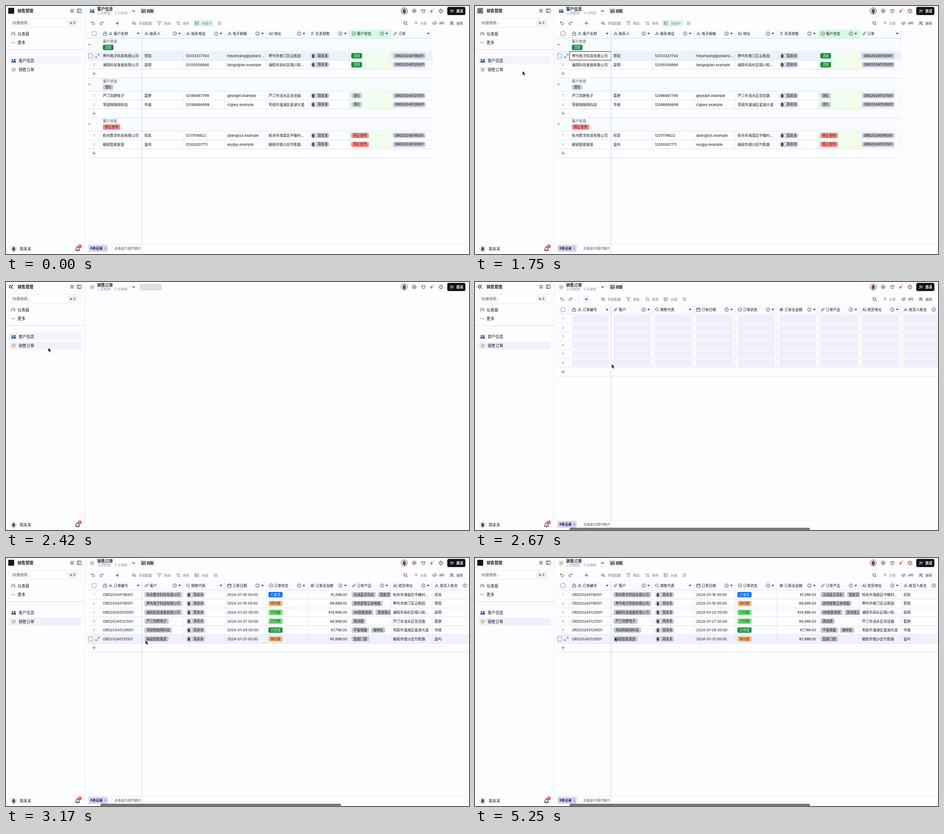
An HTML page that plays this animation: 1023x548 px, repeating every 5.33 s.

```html
<!DOCTYPE html>
<html lang="zh">
<head>
<meta charset="utf-8">
<title>销售管理</title>
<style>
html,body{margin:0;width:100%;height:100%;overflow:hidden;background:#fdfdff}
svg{display:block;width:100%;height:100%;font-family:Inter,"Noto Sans CJK SC","Noto Sans CJK",sans-serif}
</style>
</head>
<body>
<svg id="stage" viewBox="0 0 1023 548"></svg>
<script>
(() => {
const LOOP = 5330, PITCH = 19.55, INK = '#15171c', DIM = '#6f727b', LINE = '#d3ddec';
const col = i => i < 0 ? 209 : 300.6 + i * 91.56;

// drawing helpers
const txt = (x, y, s, o = {}) => {
  const {size = 7.92, fill = INK, w = 400, a = 'start'} = o;
  return `<text x="${x}" y="${y + size * .37}" font-size="${size}" fill="${fill}" font-weight="${w}" text-anchor="${a}" xml:space="preserve">${s}</text>`;
};
const box = (x, y, w, h, fill, r = 0, more = '') =>
  `<rect x="${x}" y="${y}" width="${w}" height="${h}" rx="${r}" fill="${fill}" ${more}/>`;
const hline = (x1, x2, y, c = LINE) => box(x1, y - .4, x2 - x1, .8, c);
const vline = (x, y1, y2, c = '#dbe5f3') => box(x - .4, y1, .8, y2 - y1, c);
const dot = (x, y, r, fill, more = '') => `<circle cx="${x}" cy="${y}" r="${r}" fill="${fill}" ${more}/>`;
const group = (id, s) => `<g id="${id}">${s}</g>`;

const circ = r => `M${-r} 0a${r} ${r} 0 1 0 ${2 * r} 0a${r} ${r} 0 1 0 ${-2 * r} 0`;
const ICONS = {
  menu: 'M-3.6-2.8H3.6M-3.6 0H3.6M-3.6 2.8H3.6',
  panel: 'M-4-3.8H4V3.8H-4ZM-1.2-3.8V3.8',
  fold: 'M-.4-3.8L-4.2 0L-.4 3.8M4-3.8L.2 0L4 3.8',
  gauge: 'M-2.8 2.8A4 4 0 1 1 2.8 2.8M0 .6L2-1.6',
  bell: 'M-4.6 2.6C-2.8 1-3.6-4.6 0-4.6S2.8 1 4.6 2.6ZM-1.2 4.8H1.2',
  down: 'M-2.6-1.2L0 1.4L2.6-1.2',
  grid: 'M-4-3.6H4V3.6H-4ZM-4-1H4M-1.2-1V3.6M-4 1.3H4',
  gear: 'M0-4.3L3.6-2.1V2.1L0 4.3L-3.6 2.1V-2.1Z' + circ(1.3),
  puzzle: 'M-4-1.6H-1.6C-2.4-4 .8-4.6 .8-1.8L3-3.6L4-1.4L2.4 .4C4.6 1.4 3 4 1.4 2.4L0 4L-2 2.6C-.8 .8-3.2 0-4-1.6Z',
  help: circ(4.2) + 'M-1.3-1C-1.2-2.8 1.5-2.6 1.3-.8C1.2 0 0 0 0 1M0 2.2V2.5',
  invite: 'M-3.6 3.6C-3.6 .2 1.6 .2 1.6 3.6M-2.6-1.6A1.7 1.7 0 1 0 .8-1.6A1.7 1.7 0 1 0-2.6-1.6M1.8-.6H4.4M3.1-1.9V.7',
  people: 'M-3.8 3.6C-3.8 .2 1.6 .2 1.6 3.6M-2.8-1.6A1.7 1.7 0 1 0 .6-1.6A1.7 1.7 0 1 0-2.8-1.6M1.8-3.4A1.8 1.8 0 0 1 1.8 .1M2.6 1.2C3.6 1.6 4 2.6 4 3.6',
  undo: 'M-1.6-3.6L-3.8-1.6L-1.6 .4M-3.8-1.6H1.2A2.4 2.4 0 0 1 1.2 3.2H-1.6',
  redo: 'M1.6-3.6L3.8-1.6L1.6 .4M3.8-1.6H-1.2A2.4 2.4 0 0 0-1.2 3.2H1.6',
  plus: 'M-3.6 0H3.6M0-3.6V3.6',
  eye: 'M-4.6 0C-2-4 2-4 4.6 0C2 4-2 4-4.6 0M-4 -4L4 4' + circ(1.2),
  filter: 'M-4-3.8H4L1-.2V3.8L-1 2.8V-.2Z',
  sort: 'M-2 3.6V-3.4M-4-1.4L-2-3.6L0-1.4M2-3.6V3.4M0 1.4L2 3.6L4 1.4',
  groups: 'M-4-3.6H-1V-.6H-4ZM-4 .8H-1V3.8H-4ZM1-3.2H4M1-1.2H4M1 1.2H4M1 3.2H4',
  search: 'M-3.8-.6A3.1 3.1 0 1 0 2.4-.6A3.1 3.1 0 1 0-3.8-.6M1.6 1.6L4 4',
  share: 'M-2.4 2.4L2.4-2.4M-1.6-2.4H2.4V1.6',
  code: 'M-2.2-2.6L-4.6 0L-2.2 2.6M2.2-2.6L4.6 0L2.2 2.6M.9-3.8L-.9 3.8',
  lock: 'M-3.6-.6H3.6V3.8H-3.6ZM-2.2-.6V-2A2.2 2.2 0 0 1 2.2-2V-.6',
  A: 'M-3.6 3.6L0-3.6L3.6 3.6M-2.3 1.2H2.3',
  long: 'M-4 3.4L-1.4-3.4L1.2 3.4M-3.2 1.2H.4M1.6-3H4.4M1.6 0H4.4M2.4 3H4.4',
  person: 'M-3 3.8C-3-.2 3-.2 3 3.8M-1.8-1.9A1.8 1.8 0 1 0 1.8-1.9A1.8 1.8 0 1 0-1.8-1.9',
  check: circ(4) + 'M-1.8 0L-.4 1.4L1.8-1',
  link: 'M-.6-1.4L1-3C3-4.6 4.8-2.4 3.2-.9L1.4 .9C.4 1.6-.6 1.2-1 .4M.6 1.4L-1 3C-3 4.6-4.8 2.4-3.2 .9L-1.4-.9C-.4-1.6 .6-1.2 1-.4',
  cal: 'M-3.8-3H3.8V4H-3.8ZM-3.8-.6H3.8M-1.8-4.2V-2M1.8-4.2V-2',
  hash: 'M-1-3.8L-2 3.8M2-3.8L1 3.8M-3.6-1.4H3.8M-3.8 1.4H3.6',
  info: circ(4) + 'M0-2.2V.5M0 1.7V2.1',
  expand: 'M.8-.8L3.6-3.6M1-3.8H3.8V-1M-.8 .8L-3.6 3.6M-1 3.8H-3.8V1'
};
const icon = (n, x, y, c = '#3c3f46', w = .9) =>
  `<path d="${ICONS[n]}" transform="translate(${x} ${y})" fill="none" stroke="${c}" stroke-width="${w}" stroke-linecap="round" stroke-linejoin="round"/>`;
const tri = (x, y) => `<path d="M${x - 3} ${y - 1.8}h6l-3 3.7z" fill="#444850"/>`;

const busts = (x, y) => [[-2.6, '#44708f'], [2.4, '#315c7c']].map(([d, c]) =>
  dot(x + d, y - 1.9, 2, c) + `<path d="M${x + d - 2.7} ${y + 4}v-1.6q0-2.4 2.7-2.4t2.7 2.4v1.6z" fill="${c}"/>`).join('');
const memo = (x, y) => box(x - 4.5, y - 4.3, 7.8, 9, '#e4e5e6', .8, 'stroke="#b9bcc2" stroke-width=".5"') +
  [-2, 0, 2].map(d => hline(x - 3.2, x + 1.8, y + d, '#9aa0aa')).join('') +
  `<path d="M${x - 1} ${y + 3.5}L${x + 4.3} ${y - 2.4}" stroke="#f2a62c" stroke-width="1.9"/>`;
const avatar = (x, y, r, ring = '#c9cacf') => dot(x, y, r, '#f1f1f2', `stroke="${ring}" stroke-width=".9"`) +
  `<ellipse cx="${x}" cy="${y + .4}" rx="${r * .52}" ry="${r * .72}" fill="#55565a"/>`;

// one em per wide character, fewer for latin
const ems = s => [...s].reduce((n, c) => n + (c > '\u2000' ? 1 : c > '9' ? .7 : .578), 0);
const tagWidth = s => ems(s) * 7.5 + 8.6;
const tag = (x, y, s, bg = '#c9cad2', fill = INK) =>
  box(x, y - 6, tagWidth(s), 12, bg, 3) + txt(x + 4.4, y, s, {size: 7.45, w: 500, fill});
const OWNER = '简末末';
const member = (c, y) => box(c + 5.5, y - 6, 42, 12, '#cbccd5', 5) + avatar(c + 12, y, 6.2) +
  txt(c + 22, y, OWNER, {size: 7.45, w: 500});

const STATUS = {
  活跃: ['#198a3b', '#fff'], 潜在: ['#cfd0d4'], 停止合作: ['#ff8988'],
  已发货: ['#0d6bf5', '#fff'], 待付款: ['#ffb77a'], 已付款: ['#6fe576'], 已完成: ['#1c8c3e', '#fff']
};
const statusTag = (x, y, s) => tag(x, y, s, ...STATUS[s]);

const rowNo = (n, y) => txt(194.5, y, n, {size: 6, fill: '#666', a: 'middle'});
const checkbox = (x, y) => box(x - 4.6, y - 4.6, 9.2, 9.2, '#fff', 2, 'stroke="#777c88" stroke-width=".9"');
const hoverTools = y => checkbox(187, y) + icon('expand', 202, y, '#555');

function header(first, cols, right) {
  let s = box(180, 52, right - 180, 19, '#f8fbff') + hline(180, right, 71) + checkbox(194.5, 61) +
    icon('lock', 219, 61) + icon('A', 231, 61) + txt(238, 61, first, {w: 500}) + tri(292, 61);
  cols.forEach(([ic, name, info], i) => {
    const c = col(i);
    if (name === '客户状态') s += box(c, 52, 91.56, 19, '#d5fbe1');
    s += icon(ic, c + 10, 61) + txt(c + 17, 61, name, {w: 500}) + tri(c + 83, 61) + vline(c + 91.56, 52, 71);
    if (info) s += icon('info', c + 72, 61);
  });
  return s;
}
const rowLines = (y, right, n) => {
  let s = hline(180, right, y + PITCH / 2);
  for (let i = 1; i <= n; i++) s += vline(col(i), y - PITCH / 2, y + PITCH / 2);
  return s;
};
const tool = (ic, x, s, c = DIM) => icon(ic, x, 38, c) + txt(x + 10, 38, s, {size: 7.35, fill: c});
const chrome = grouped => icon('undo', 192, 38) + icon('redo', 211, 38) + vline(228.5, 33, 43, '#dcdfe8') +
  dot(246, 38, 7, '#fff', 'stroke="#d5d8e0" stroke-width=".8"') + icon('plus', 246, 38, INK) + vline(263.5, 33, 43, '#dcdfe8') +
  tool('eye', 283, '字段配置') + tool('filter', 339, '筛选') + tool('sort', 381, '排序') +
  (grouped ? box(414, 30, 46, 16, '#e2f8e7', 3) : '') + tool('groups', 422, grouped ? '分组(1)' : '分组') +
  icon('menu', grouped ? 472 : 463, 38, DIM) + icon('search', 883, 38, INK) + tool('share', 905, '分享') +
  tool('code', 947, 'API', INK) + tool('people', 985, '协同', INK) +
  box(295.5, 3, 35, 16, '#f1f3f3', 3) + icon('grid', 304, 11, INK) + txt(311, 11, '视图', {size: 7.5, w: 600}) +
  hline(180, 1023, 526, '#dbe6f3') + box(182, 528, 42.5, 15, '#d9cdf8', 3) +
  txt(186.5, 535.5, '6条记录', {size: 7.4, w: 600}) +
  `<path d="M220.3 533.5l-1.8 2l1.8 2" fill="none" stroke="${INK}" stroke-width=".8"/>` +
  txt(239.5, 535.7, '点击此行进行统计', {size: 7.35, fill: '#3c3f46'}) + vline(300.6, 52, 548, '#b5d0e5');

const clients = [
  ['霁屿电子科技有限公司', '贺砚', '12033337744', 'heyanyang@jydianz...', '霁屿市南汀区云帆园', 'ORD20240118001'],
  ['澜陌科技发展有限公司', '梁栩', '12055558866', 'liangx@lan.example', '澜陌市高杉区晴川软...', 'ORD20240120001'],
  ['芦汀岚野电子', '葛野', '12066667799', 'geye@lt.example', '芦汀市浅水区花径路', 'ORD20240127001'],
  ['苇砚物联网科技', '岑络', '12088886699', 'cl@wy.example', '苇砚市漫湖区星湖大道', 'ORD20240129001'],
  ['栎舟数字科技有限公司', '祁岚', '12011116622', 'qilan@lzs.example', '栎舟市海棠区中槐村...', 'ORD20240116001'],
  ['椒砚智能家居', '温屿', '12000007711', 'wy@jy.example', '椒砚市银沙区竹影路', 'ORD20240131001']
];

function clientPage() {
  const R = 941.5;
  let s = header('客户名称', [['A', '联系人', 1], ['A', '联系电话', 1], ['A', '电子邮箱', 1], ['long', '地址', 1],
    ['person', '负责销售', 1], ['check', '客户状态', 1], ['link', '订单', 0]], R);
  ['活跃', '潜在', '停止合作'].forEach((st, g) => {
    const y0 = 71.2 + g * 88;
    s += box(180, y0, R - 180, 29, '#f8fcff') + hline(180, R, y0) + hline(180, R, y0 + 29) +
      icon('down', 184.5, y0 + 14, '#333', 1) + txt(214, y0 + 7, '客户状态', {fill: '#4a4d55'}) + statusTag(214, y0 + 20.2, st);
    for (let k = 0; k < 2; k++) {
      const y = y0 + 38.9 + k * PITCH, n = g * 2 + k, [name, who, tel, mail, addr, ord] = clients[n];
      const hot = n === 0;
      if (hot) s += group('rowHover', box(180, y - 9.8, R - 180, PITCH, '#eef1fc') + hoverTools(y));
      s += box(col(5), y - 9.8, 91.56, PITCH, 'url(#mint)') + rowLines(y, R, 7);
      s += hot ? group('rowOne', rowNo(1, y)) + group('cell', box(209, y - 9.6, 91.4, 19.2, '#fdfdff', 0, 'stroke="#25272c" stroke-width="1"')) : rowNo(k + 1, y);
      s += [name, who, tel, mail, addr].map((v, i) => txt(col(i - 1) + 5, y, v)).join('') +
        member(col(4), y) + statusTag(col(5) + 4.6, y, st) + tag(col(6) + 4.8, y, ord);
    }
    s += icon('plus', 194.5, y0 + 78.2, '#555') + hline(180, R, y0 + 88);
  });
  return s + chrome(true);
}

const orders = [
  [4, '2024-01-16', '已发货', '1,398.00', '无线蓝牙耳机,智能音箱'],
  [0, '2024-01-18', '待付款', '6,999.00', '高性能笔记本电脑'],
  [1, '2024-01-20', '已付款', '14,998.00', '4K智能电视,游戏笔记本'],
  [2, '2024-01-27', '已付款', '6,999.00', '路由器'],
  [3, '2024-01-29', '已完成', '7,798.00', '平板电脑,咖啡机'],
  [5, '2024-01-31', '待付款', '5,999.00', '智能门锁']
];

function orderPage() {
  let base = header('订单编号', [['link', '客户', 1], ['search', '销售代表', 0], ['cal', '订单日期', 1], ['check', '订单状态', 1],
    ['hash', '订单总金额', 1], ['link', '订单产品', 1], ['long', '收货地址', 1], ['A', '收货人姓名', 1]], 1023);
  let bars = '', data = '';
  orders.forEach(([id, day, st, sum, goods], k) => {
    const y = 81 + k * PITCH, c = clients[id];
    base += k === 5
      ? group('lastHover', box(180, y - 9.8, 843, PITCH, '#edf2fc') + hoverTools(y)) + group('lastNo', rowNo(6, y))
      : rowNo(k + 1, y);
    base += rowLines(y, 1023, 7);
    for (let i = -1; i < 8; i++) bars += box(col(i) + 5, y - 7.8, 82, 15.4, '#f1eefc', 2);
    let x = col(5) + 5.2;
    const tags = goods.split(',').map(g => { const t = tag(x, y, g); x += tagWidth(g) + 4.6; return t; }).join('');
    data += txt(214, y, c[5]) + tag(col(0) + 5.2, y, c[0]) + member(col(1), y) +
      txt(col(2) + 5, y, day + ' 00:00') + statusTag(col(3) + 4.6, y, st) +
      txt(col(4) + 87, y, '¥' + sum, {a: 'end'}) + `<g clip-path="url(#goods)">${tags}</g>` +
      txt(col(6) + 5, y, c[4]) + txt(col(7) + 5, y, c[1]);
  });
  return base + group('bars', bars) + group('data', data) + icon('plus', 194.5, 198.2, '#555') +
    hline(180, 1023, 208) + chrome(false) + box(209, 543, 531, 6, '#77787c', 2.5);
}

const heading = (pic, name, ago) => pic(190.5, 11) + txt(201.5, 7, name, {size: 8.7, w: 600}) +
  txt(201.5, 15.6, '上次修改:', {size: 7.3, fill: '#8286a3'}) + txt(240, 15.6, ago, {size: 7.3, fill: '#8286a3'});
const actions = () => icon('down', 282, 11, INK, 1.1) + icon('gear', 902, 11, INK) + icon('puzzle', 922, 11, INK) +
  `<path d="M940 7q.6 4 4.6 4.8q-4 .8-4.6 4.8q-.6-4-4.6-4.8q4-.8 4.6-4.8zM944.3 5.6q.3 1.8 2 2.1q-1.7.4-2 2.1q-.3-1.7-2-2.1q1.7-.3 2-2.1z" fill="#f4702c"/>` +
  icon('help', 961, 11, INK) + box(975, 2, 40, 18, '#101218', 3.5) + icon('invite', 985, 11, '#fff') +
  txt(994.8, 11, '邀请', {size: 7.6, w: 600, fill: '#fff'});

const nav = {size: 8.6, w: 500};
const sidebar = () => vline(174.4, 0, 548, '#d5e4f4') + txt(25.5, 10.5, '销售管理', {size: 8.7, w: 600}) +
  icon('menu', 146, 10.5, INK) + icon('panel', 162, 10.5, INK) +
  group('logo', box(5, 4, 13, 13, '#15171c')) + group('fold', icon('fold', 11, 10.5, INK, 1.3)) +
  box(6.4, 27.4, 160, 19, '#fff', 3, 'stroke="#e0e5f0" stroke-width=".8"') + txt(14, 37, '快捷搜索...', {size: 8.5, fill: '#5c6069'}) +
  box(136.4, 31, 21.6, 12, '#f1f2f6', 2.5, 'stroke="#dcdfe6" stroke-width=".6"') + txt(147.2, 37, '⌘ K', {size: 7, a: 'middle', fill: '#44474f'}) +
  icon('gauge', 16, 62, INK) + txt(25.6, 61.8, '仪表盘', nav) +
  [-3, 0, 3].map(d => dot(16 + d, 81, .8, INK)).join('') + txt(25.6, 81, '更多', nav) + hline(0, 174, 96.2, '#c5d3e6') +
  group('navOne', box(6, 112, 160.5, 17, '#f2f3fb', 3)) + group('navTwo', box(6, 132, 160.5, 17, '#eff1fb', 3)) +
  busts(17, 121) + txt(28, 120.9, '客户信息', nav) + memo(17, 140.4) + txt(28, 140.4, '销售订单', nav) +
  avatar(17, 536.6, 6.6) + txt(30, 536.6, OWNER, {size: 8.6}) + icon('bell', 158, 537, INK, 1.1) +
  dot(163, 531, 4.3, '#ef4b4b') + txt(163, 531, '5', {size: 5.5, fill: '#fff', w: 600, a: 'middle'});

const stage = document.getElementById('stage');
stage.innerHTML = `<defs><linearGradient id="mint"><stop offset="0" stop-color="#e6fff5"/><stop offset=".6" stop-color="#f0fff0"/>
  <stop offset="1" stop-color="#f7fde4"/></linearGradient><clipPath id="goods">${box(col(5), 71, 91.3, 130, '#000')}</clipPath></defs>` +
  box(0, 0, 1023, 548, '#fdfdff') + sidebar() + actions() +
  group('clients', clientPage() + heading(busts, '客户信息', '3 小时前') + avatar(880, 11, 7, '#222')) +
  group('orderHead', heading(memo, '销售订单', '5 分钟前') + avatar(880, 11, 7, '#a8222b')) +
  group('loading', box(295, 4, 49, 14.4, '#dddde3', 3)) +
  group('orders', orderPage()) +
  group('cursor', '<path d="M0 0V9.4L2.2 7.5L3.7 10.9L5.4 10.1L3.9 6.9H6.7Z" fill="#0b0b0d" stroke="#fff" stroke-width=".6"/>');

const el = {};
stage.querySelectorAll('g[id]').forEach(g => el[g.id] = g);
const show = (id, on) => el[id].setAttribute('visibility', on ? 'inherit' : 'hidden');
const fade = (id, v) => el[id].setAttribute('opacity', v);

// pointer: time, x, y
const path = [[0, 264.6, 110.4], [750, 265, 110.6], [1420, 265, 111], [1670, 186, 128], [1750, 105, 143.5], [1920, 98, 144.5],
  [2000, 94, 144.5], [2250, 93.4, 145], [2500, 180, 160], [2670, 302, 181], [2750, 306, 181.5], [2920, 308, 181.5],
  [3250, 308, 180], [3420, 308.4, 178], [3500, 308.8, 176.5], [3670, 309, 175], [3920, 308.8, 174.3], [4250, 309, 174.6], [4920, 308.6, 174.8]];
const held = t => path.filter(p => p[0] <= t).pop();

function update(t) {
  const [, x, y] = held(t);
  el.cursor.setAttribute('transform', `translate(${x} ${y})`);
  show('cursor', t >= 170);
  show('clients', t < 2420);
  show('orderHead', t >= 2420);
  show('loading', t >= 2420 && t < 2670);
  show('orders', t >= 2670);
  show('cell', t >= 420);
  show('rowHover', t < 2250);
  show('rowOne', t >= 2250);
  show('lastHover', t >= 2750);
  show('lastNo', t < 2750);
  show('bars', t < 3170);
  show('data', t >= 3170);
  show('navOne', t < 2500);
  show('navTwo', t >= 1920);
  const f = t < 1750 ? 0 : t < 1920 ? .5 : t < 2750 ? 1 : t < 2920 ? .6 : 0;
  fade('fold', f);
  fade('logo', 1 - f);
}
function tick() {
  update(performance.now() % LOOP);
  requestAnimationFrame(tick);
}
tick();
})();
</script>
</body>
</html>
```
